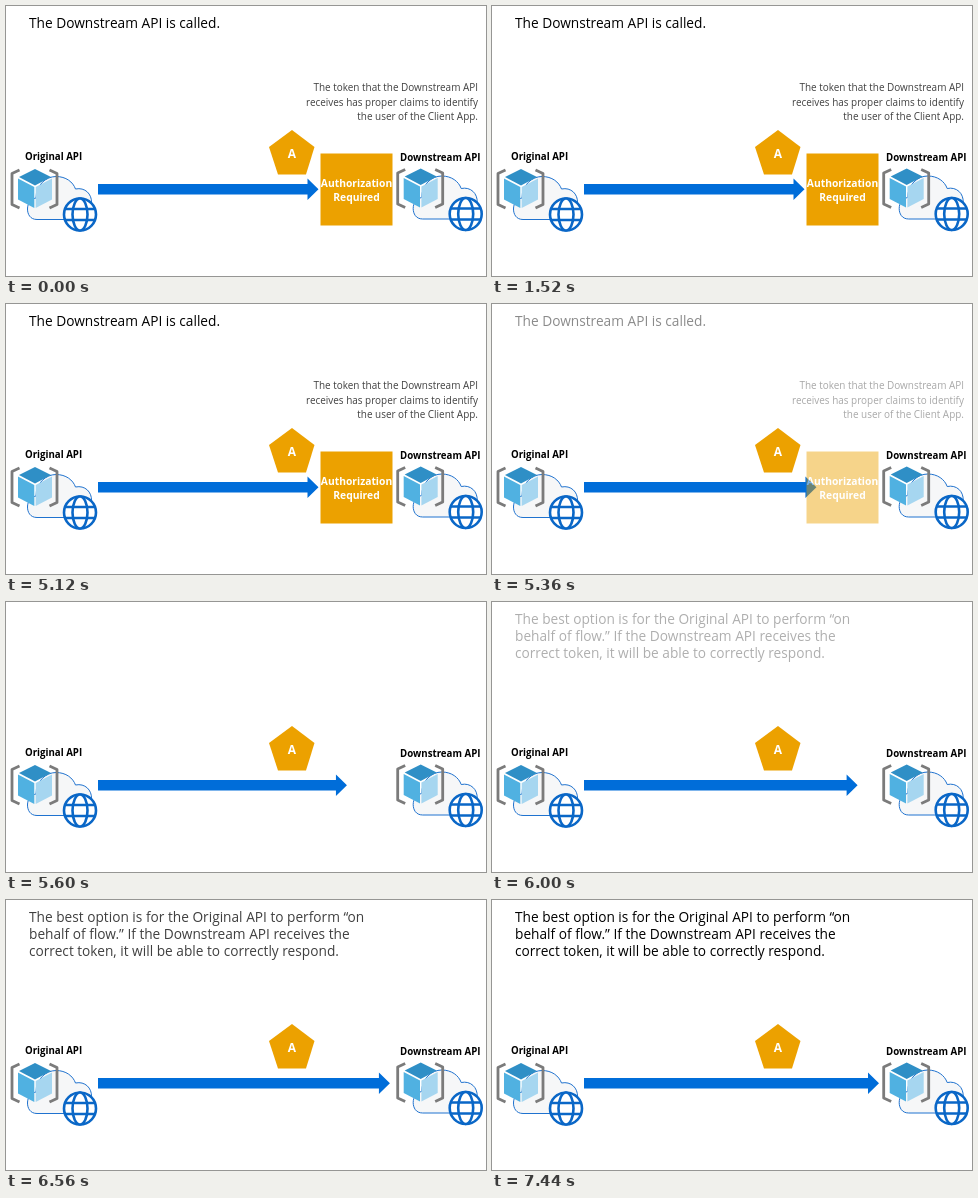
These frames come from a looping animation (480 by 270 pixels, 8000 ms). An HTML page:

```html
<!DOCTYPE html>
<html lang="en">
<head>
<meta charset="utf-8">
<title>Downstream API call</title>
<style>
  html, body { margin: 0; width: 100%; height: 100%; overflow: hidden; background: #fff; }
  svg { display: block; width: 100%; height: 100%; font-family: "Open Sans", "Noto Sans", sans-serif; }
  .title { font-size: 13.7px; font-weight: 500; }
  .note { font-size: 9.95px; fill: #404040; text-anchor: end; }
  .label { font-size: 9.7px; font-weight: 650; }
  .badge { font-size: 10.3px; font-weight: 700; fill: #fff; text-anchor: middle; }
</style>
</head>
<body>
<svg viewBox="0 0 480 270">
  <defs>
    <g id="api">
      <path d="M31 213.500 C24 213.500 21.500 208 21.500 203 C21.500 197 25 193 30 192 C30 179 40 170.500 50 170.500 C60 170.500 67 176 69.500 183 C79 181 86 188 85.500 197 C85 207 80 213.500 72 213.500Z"
            fill="#f6f7f8" stroke="#1f72cf"/>
      <g fill="none" stroke="#7b7b7b" stroke-width="2.8" stroke-linejoin="round">
        <path d="M13.500 164 L6 167.500 V198.500 L13.500 202"/>
        <path d="M43.500 164 L51 167.500 V198.500 L43.500 202"/>
      </g>
      <path d="M29 163 L45 171 L29 179.500 L13 171Z" fill="#2f8fc6"/>
      <path d="M12 172.500 L28.300 181 V202 L12 193.500Z" fill="#50b1e1"/>
      <path d="M46 172.500 L29.700 181 V202 L46 193.500Z" fill="#a6d6f0"/>
      <g fill="#fff" stroke="#0a67c7" stroke-width="2.6">
        <circle cx="74" cy="208.500" r="16"/>
        <ellipse cx="74" cy="208.500" rx="7.500" ry="16"/>
        <path d="M59 203 H89 M59 214 H89" stroke-width="2.4"/>
      </g>
    </g>
  </defs>
  <rect width="480" height="270" fill="#fff"/>

  <use href="#api"/>
  <use href="#api" x="385.700" y="-.5"/>
  <text class="label" x="19" y="154">Original API</text>
  <text class="label" x="394" y="155">Downstream API</text>

  <path id="arrow" fill="#006dd9"/>
  <path d="M286 124 L308.500 141 L300 168.500 H272 L263 141Z" fill="#eca100"/>
  <text class="badge" x="286" y="152" style="font-size:12px">A</text>

  <g id="before">
    <text class="title" x="23" y="22">The Downstream API is called.</text>
    <text class="note" x="472" y="85">The token that the Downstream API</text>
    <text class="note" x="472" y="99.500">receives has proper claims to identify</text>
    <text class="note" x="472" y="114">the user of the Client App.</text>
    <rect x="314.500" y="147.500" width="72" height="72" fill="#eca100"/>
    <text class="badge" x="350.500" y="181">Authorization</text>
    <text class="badge" x="350.500" y="194.500">Required</text>
  </g>

  <g id="after" class="title">
    <text x="23" y="22">The best option is for the Original API to perform “on</text>
    <text x="23" y="39">behalf of flow.” If the Downstream API receives the</text>
    <text x="23" y="56">correct token, it will be able to correctly respond.</text>
  </g>
</svg>
<script>
  const LOOP = 8000, STEP = 80;
  const [arrow, before, after] = ["arrow", "before", "after"].map(id => document.getElementById(id));

  const progress = (t, start, end) => Math.min(1, Math.max(0, (t - start) / (end - start)));
  // Quick start with a long settling tail.
  const settle = p => 1 - (1 - p ** 1.4) ** 3.5;

  function draw(now) {
    const t = Math.floor(now % LOOP / STEP) * STEP;
    const tip = 312.5 + 74.5 * settle(progress(t, 5120, 7200));
    const neck = tip - 11;
    arrow.setAttribute("d", `M92 178 H${neck} V172.500 L${tip} 183.200 L${neck} 194 V188.500 H92Z`);
    before.setAttribute("opacity", 1 - progress(t, 5120, 5560));
    after.setAttribute("opacity", progress(t, 5600, 6880));
  }

  const began = performance.now();
  function tick() {
    draw(performance.now() - began);
    requestAnimationFrame(tick);
  }
  tick();
</script>
</body>
</html>
```
